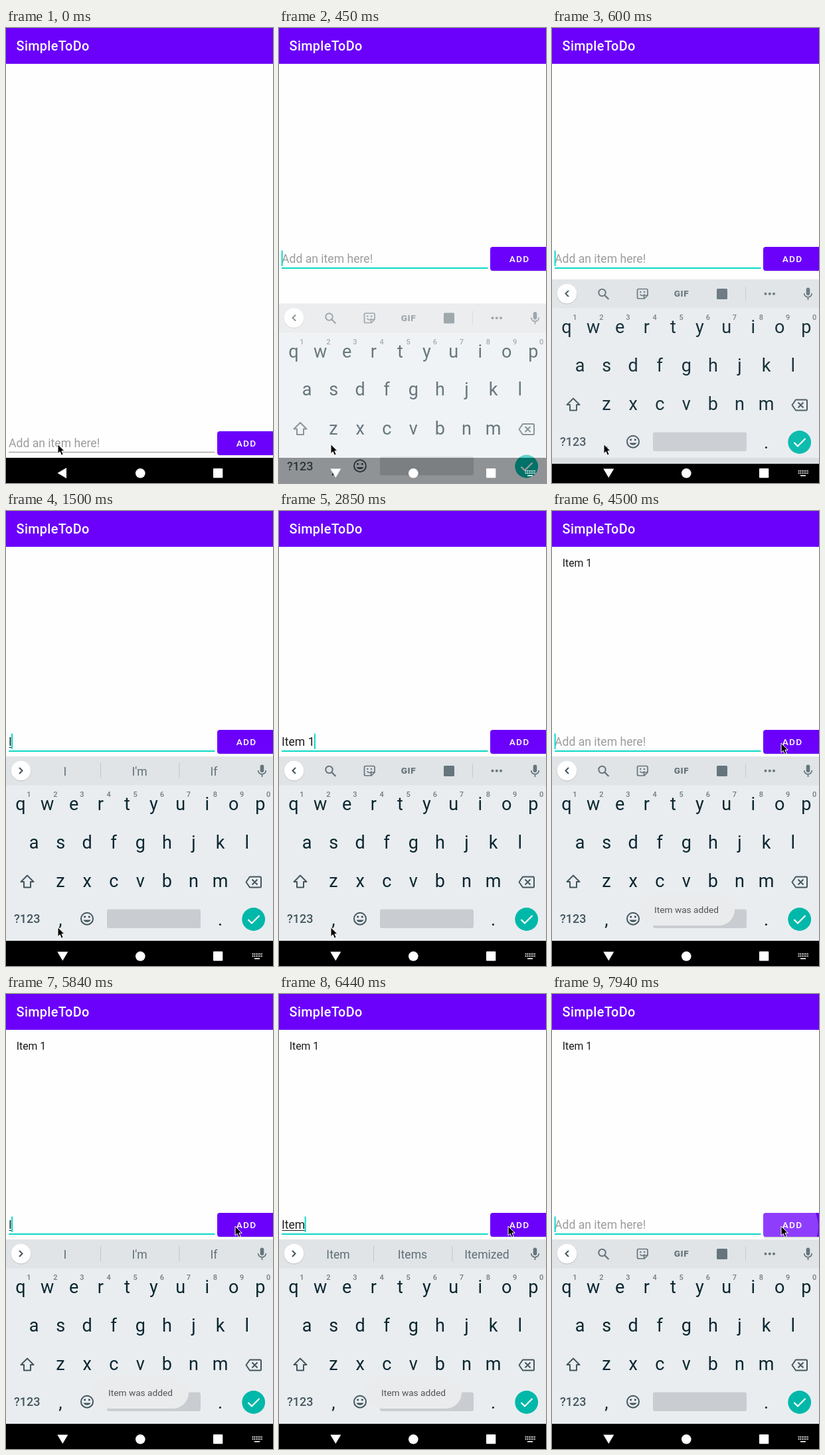
An HTML page for the animation above (8 s loop, 402x686 px).

```html
<!DOCTYPE html>
<html lang="en">
<head>
<meta charset="utf-8">
<title>To-do list</title>
<style>
  html, body { margin: 0; width: 100%; height: 100%; overflow: hidden; background: #fefefe; }
  svg { display: block; width: 402px; height: 686px; font-family: Roboto, sans-serif; }
  text { white-space: pre; }
  .mid { text-anchor: middle; }
  .med { font-weight: 500; }
  .line { fill: none; stroke: #43565e; stroke-width: 2; }
  .icon { fill: #66757c; }
  .field { font-size: 17.6px; }
  .word { font-size: 17.6px; fill: #5f6f76; }
  .key { font-size: 27px; fill: #0b2730; }
  .num { font-size: 11px; font-weight: 500; fill: #6f7b81; }
</style>
</head>
<body>
<svg viewBox="0 0 402 686" xmlns="http://www.w3.org/2000/svg">
  <defs>
    <linearGradient id="fade" x2="0" y2="1">
      <stop offset="0" stop-color="#000" stop-opacity=".16"/>
      <stop offset="1" stop-color="#000" stop-opacity="0"/>
    </linearGradient>
    <clipPath id="btn"><rect x="318" y="330" width="88" height="36" rx="4"/></clipPath>
  </defs>

  <rect width="402" height="686" fill="#fefefe"/>
  <rect width="402" height="54" fill="#6b00fb"/>
  <text class="med" x="15.6" y="34" font-size="19.8" letter-spacing=".35" fill="#fff">SimpleToDo</text>
  <text id="item" x="15.7" y="83.5" font-size="15.8" fill="#1c1c1c">Item 1</text>

  <g id="row">
    <text id="hint" class="field" x="4" y="354" fill="#9c9c9c">Add an item here!</text>
    <text id="typed" class="field" x="4" y="354" fill="#1d1d1d"></text>
    <rect id="compose" x="4.5" y="356" height="1" fill="#1d1d1d"/>
    <rect id="base" x="4" width="310.5"/>
    <rect id="caret" y="335.5" width="2" height="23.5" fill="#0bd9c6"/>
    <rect x="319" y="365" width="83" height="3" fill="url(#fade)"/>
    <rect id="lift" x="319" y="365" width="83" height="5" fill="url(#fade)"/>
    <rect x="318" y="330" width="88" height="36" rx="4" fill="#6b00fb"/>
    <g clip-path="url(#btn)"><circle id="ripple" cx="347" cy="351" fill="#fff" fill-opacity=".24"/></g>
    <text class="med" x="346.7" y="353.3" font-size="13.7" letter-spacing="1.22" fill="#fff">ADD</text>
  </g>

  <rect y="648" width="402" height="38"/>

  <g id="kb">
    <rect y="370" width="402" height="278" fill="#e9edf0"/>
    <rect y="370" width="402" height="43.5" fill="#e0e4e7"/>
    <circle cx="22.5" cy="392.3" r="15.3" fill="#000" opacity=".12"/>
    <circle cx="22.5" cy="391.5" r="14.8" fill="#fff"/>
    <path id="chev" class="line" d="M25 387l-4.5 4.5 4.5 4.5"/>

    <g id="tools">
      <circle class="line" cx="75.5" cy="390" r="5.2" style="stroke:#66757c"/>
      <path class="line" d="M79.4 394l6 6" style="stroke:#66757c;stroke-width:2.4"/>
      <path class="line" d="M130.5 384.5h11.5a2 2 0 0 1 2 2v7.5l-5 5h-8.500a2 2 0 0 1-2-2v-10.500a2 2 0 0 1 2-2z M144 394h-3.500a2 2 0 0 0-2 2v3" style="stroke:#66757c;stroke-width:1.7"/>
      <path class="line" d="M132.500 392.500q3.500 4 7 0" style="stroke:#66757c;stroke-width:1.5"/>
      <circle class="icon" cx="133.300" cy="389" r="1.200"/><circle class="icon" cx="139" cy="389" r="1.200"/>
      <text class="mid icon" x="195" y="396.300" font-size="13.500" font-weight="900" letter-spacing=".6">GIF</text>
      <rect class="icon" x="248" y="384" width="16" height="16" rx="1.500"/>
      <rect x="291" y="381" width="1" height="21" fill="#c4cacd"/>
      <circle class="icon" cx="321.500" cy="391.800" r="2"/><circle class="icon" cx="327.800" cy="391.800" r="2"/><circle class="icon" cx="334" cy="391.800" r="2"/>
    </g>
    <g id="words">
      <text class="mid word" x="89" y="398.5"></text>
      <text class="mid word" x="201" y="398.5"></text>
      <text class="mid word" x="313" y="398.5"></text>
      <rect x="142" y="380" width="1" height="23" fill="#c0c6ca"/>
      <rect x="260.5" y="380" width="1" height="23" fill="#c0c6ca"/>
    </g>
    <rect class="icon" x="382.7" y="382.500" width="5.600" height="11.500" rx="2.800"/>
    <path class="line" d="M379.700 391a5.800 5.800 0 0 0 11.600 0M385.500 397v4" style="stroke:#66757c;stroke-width:1.700"/>

    <g id="keys"></g>
    <path class="line" d="M32 549.500l9.500 9.500h-4.500v8.500h-10v-8.500h-4.500z" stroke-linejoin="round"/>
    <path class="line" d="M367 551.500h15.500q1.500 0 1.500 1.500v13q0 1.500-1.500 1.500h-15.500l-5.500-8z M370.500 555.500l8 8m0-8l-8 8" stroke-linejoin="round"/>
    <text class="med mid" x="31.700" y="621.300" font-size="18" fill="#43565e">?123</text>
    <circle class="line" cx="122" cy="614.700" r="9"/>
    <circle cx="118.700" cy="611.800" r="1.600" fill="#43565e"/><circle cx="125.300" cy="611.800" r="1.600" fill="#43565e"/>
    <path d="M116.700 616.500h10.600a5.500 4.500 0 0 1-10.600 0z" fill="#43565e"/>
    <rect x="152" y="600.500" width="141" height="28.500" rx="3" fill="#c9cdd1"/>
    <circle cx="372.700" cy="615.500" r="17.400" fill="#00b8a9"/>
    <path d="M364.500 616l5.500 5.500 11.500-11.500" fill="none" stroke="#fff" stroke-width="2.200"/>
  </g>

  <g fill="#fff">
    <path id="back" d="M77.500 671l13.500-8v16z"/>
    <circle cx="202.300" cy="671.300" r="7.300"/>
    <rect x="312" y="664" width="14.300" height="14.300" rx="1"/>
    <g id="ime"><rect x="374" y="674" width="8" height="1.600"/></g>
  </g>

  <g id="toast">
    <rect x="130" y="577" width="145" height="48" rx="24" fill="#eaebec"/>
    <text class="mid" x="202.500" y="605.500" font-size="13.700" fill="#525354">Item was added</text>
  </g>
  <path id="mouse" d="M.5 .5v14.300l3.200-3 2.300 5.400 2.700-1.100-2.300-5.300h4.300z" fill="#000" stroke="#fff" stroke-width="1"/>
</svg>

<script>
const $ = id => document.getElementById(id);
const LOOP = 8000;

function put(parent, tag, attrs, text = '') {
  const el = document.createElementNS('http://www.w3.org/2000/svg', tag);
  for (const k in attrs) el.setAttribute(k, attrs[k]);
  el.textContent = text;
  parent.append(el);
}
const set = (id, attrs) => {
  for (const k in attrs) $(id).setAttribute(k, attrs[k]);
};
const show = (id, on) => set(id, { visibility: on ? 'visible' : 'hidden' });

// Keyboard letters: row text, first centre, baseline
for (const [row, x0, y] of [['qwertyuiop', 22, 451], ['asdfghjkl', 42, 508.5], ['zxcvbnm', 82, 567]]) {
  [...row].forEach((ch, i) => {
    const x = x0 + i * 40.1;
    put($('keys'), 'text', { class: 'mid key', x, y }, ch);
    if (y < 460) put($('keys'), 'text', { class: 'mid num', x: x + 12.3, y: 431 }, (i + 1) % 10);
  });
}
put($('keys'), 'text', { class: 'mid key', x: 82, y: 625 }, ',');
put($('keys'), 'text', { class: 'mid key', x: 322.5, y: 625 }, '.');
for (let i = 0; i < 12; i++) {
  put($('ime'), 'rect', { x: 370.6 + (i % 6) * 2.7, y: 667 + (i / 6 | 0) * 3.2, width: 1.7, height: 1.7 });
}

const start = {
  low: 278, focus: 0, caret: 0, text: '', compose: 0, words: null,
  kb: 0, slide: 0, turn: 0, item: 0, toast: 0, ripple: 0, mouse: [77.5, 627]
};
const next = ['is', 'in', 'and'];
const itemWords = ['Item', 'Items', 'Itemized'];

// Each step changes part of the state from its time on
const steps = [
  [0, {}],
  [150, { focus: 1, caret: 1 }],
  [300, { low: 0, kb: .22, slide: 62, turn: -45 }],
  [450, { kb: .62, slide: 45.5, turn: -90 }],
  [600, { kb: .94, slide: 9 }],
  [750, { kb: 1, slide: 0, caret: 0 }],
  [1200, { caret: 1 }],
  [1350, { text: 'I', compose: 1 }],
  [1500, { words: ['I', "I'm", 'If'] }],
  [1800, { text: 'It', words: ['It', "It's", 'Its'] }],
  [2250, { text: 'Ite' }],
  [2400, { text: 'Item', words: ['Ite', 'Item', 'Iter'] }],
  [2550, { text: 'Item ', compose: 0, words: next }],
  [2850, { text: 'Item 1', words: null }],
  [3000, { mouse: [92, 606] }],
  [3150, { mouse: [158, 532] }],
  [3300, { mouse: [262, 424] }],
  [3450, { mouse: [340, 364], caret: 0 }],
  [3600, { mouse: [366, 345] }],
  [3750, { mouse: [350, 347] }],
  [3900, { mouse: [344.5, 349.5], caret: 1 }],
  [4200, { text: '', ripple: 54 }],
  [4350, { ripple: 0, item: 1, toast: .6 }],
  [4500, { toast: 1 }],
  [4800, { caret: 0 }],
  [5250, { caret: 1 }],
  [5840, { text: 'I', compose: 1, words: ['I', "I'm", 'If'] }],
  [6140, { text: 'It', words: ['It', "It's", 'Its'] }],
  [6290, { text: 'Ite', words: ['Ite', 'Item', 'Iter'] }],
  [6440, { text: 'Item', words: itemWords }],
  [6590, { toast: .5 }],
  [6740, { text: 'Item ', compose: 0, words: next, toast: 0 }],
  [7040, { text: 'Item 2', words: null }],
  [7490, { caret: 0 }],
  [7940, { text: '', caret: 1, ripple: 54 }]
];
let acc = start;
const states = steps.map(([t, change]) => [t, acc = { ...acc, ...change }]);

function draw(s) {
  set('row', { transform: `translate(0 ${s.low})` });
  $('typed').textContent = s.text;
  const width = s.text ? $('typed').getComputedTextLength() : 0;
  show('hint', !s.text);
  show('compose', s.compose);
  set('compose', { width: Math.max(0, width - 1) });
  set('base', s.focus
    ? { y: 361, height: 2, fill: '#0bd9c6' }
    : { y: 361, height: 1, fill: '#8a8a8a' });
  show('caret', s.caret);
  set('caret', { x: width ? 3.3 + width : 3.6 });
  set('ripple', { r: s.ripple });
  show('lift', s.ripple);

  set('kb', { opacity: s.kb, transform: `translate(0 ${s.slide})` });
  show('tools', !s.words);
  show('words', s.words);
  if (s.words) $('words').querySelectorAll('text').forEach((el, i) => el.textContent = s.words[i]);
  set('chev', { transform: s.words ? 'rotate(180 22.5 391.5)' : '' });

  set('back', { transform: s.turn ? `translate(.8 0) rotate(${s.turn} 84.5 671)` : '' });
  show('ime', s.kb);
  show('item', s.item);
  set('toast', { opacity: s.toast });
  set('mouse', { transform: `translate(${s.mouse})` });
}

let shown;
function tick() {
  const t = performance.now() % LOOP;
  const state = states.findLast(([at]) => at <= t)[1];
  if (state !== shown) draw(shown = state);
  requestAnimationFrame(tick);
}
tick();
</script>
</body>
</html>
```
